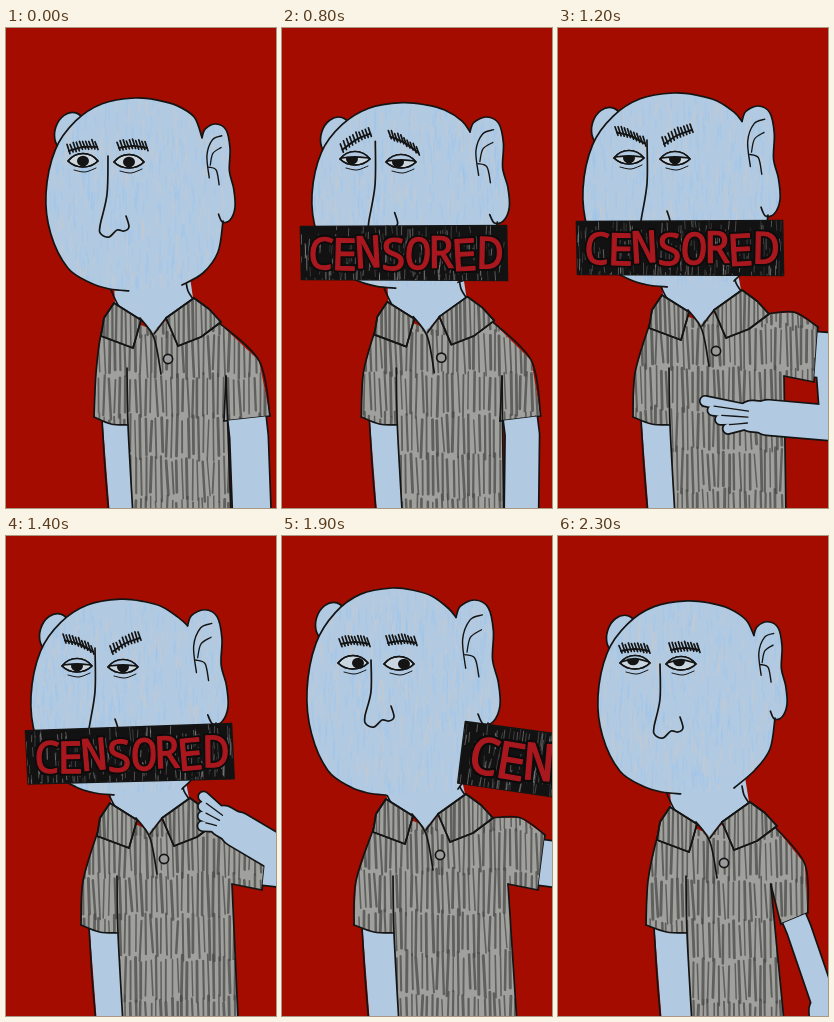
An HTML page with a canvas for the animation above (2.4 s loop, 270 by 480 pixels).

```html
<!DOCTYPE html>
<html lang="en">
<head>
<meta charset="utf-8">
<title>Censored</title>
<style>
html, body { margin: 0; width: 100%; height: 100%; overflow: hidden; background: #a40c00; }
canvas { display: block; width: 100vw; height: 100vh; }
</style>
</head>
<body>
<canvas id="stage" width="270" height="480"></canvas>
<script>
const ctx = document.getElementById('stage').getContext('2d');
const LOOP = 2400, STEP = 100;
const RED = '#a40c00', SKIN = '#b1cae2', CLOTH = '#a0a09d', INK = '#141414';

const mix = (a, b, k) => a + (b - a) * k;
const mixPt = (p, q, k) => [mix(p[0], q[0], k), mix(p[1], q[1], k)];
const clamp = k => Math.min(1, Math.max(0, k));

// The acting: each mood or move is a number from 0 to 1.
function acting(t) {
  const ramp = (a, b) => clamp((t - a) / (b - a));
  const ease = (a, b) => { const k = ramp(a, b); return k * k * (3 - 2 * k); };
  const drop = ease(1900, 2350);
  return {
    turn: ramp(0, 1200) - ramp(1900, 2300),
    hop: ramp(400, 600) - ramp(600, 800),
    worry: ease(600, 800) - ease(800, 1150),
    anger: ease(850, 1200) - ease(1650, 1900),
    look: ease(1600, 1880) - ease(2000, 2300),
    roll: ease(2000, 2300) - ramp(2300, LOOP),
    raise: ease(850, 1200) - ease(1950, LOOP),
    reach: ease(800, 1200),
    grab: ease(1200, 1550),
    hold: ease(1200, 1550) * (1 - drop),
    grow: ramp(230, 700),
    pull: Math.max(0, (t - 1600) / 300) ** 1.2,
    drop
  };
}

function random(seed) {
  return () => {
    seed = (seed * 1664525 + 1013904223) >>> 0;
    return seed / 4294967296;
  };
}

// Smooth line through all points
function curve(pts, move = true) {
  if (move) ctx.moveTo(...pts[0]);
  else ctx.lineTo(...pts[0]);
  for (let i = 0; i < pts.length - 1; i++) {
    const a = pts[i - 1] || pts[i], b = pts[i], c = pts[i + 1], d = pts[i + 2] || c;
    ctx.bezierCurveTo(b[0] + (c[0] - a[0]) / 6, b[1] + (c[1] - a[1]) / 6,
      c[0] - (d[0] - b[0]) / 6, c[1] - (d[1] - b[1]) / 6, c[0], c[1]);
  }
}

function ink(pts, width = 1.7) {
  ctx.beginPath();
  curve(pts);
  ctx.lineWidth = width;
  ctx.strokeStyle = INK;
  ctx.stroke();
}

function poly(pts) {
  const p = new Path2D();
  pts.forEach(q => p.lineTo(...q));
  p.closePath();
  return p;
}

function oval(x, y, rx, ry, turn = 0) {
  const p = new Path2D();
  p.ellipse(x, y, rx, ry, turn, 0, 7);
  return p;
}

function outline(path, fill) {
  ctx.fillStyle = fill;
  ctx.fill(path);
  ctx.lineWidth = 1.7;
  ctx.strokeStyle = INK;
  ctx.stroke(path);
}

function inside(path, paint) {
  ctx.save();
  ctx.clip(path);
  paint();
  ctx.restore();
}

function crayon(rnd, x, y, w, h) {
  ctx.lineWidth = 1.6;
  for (let i = 0; i < w * h / 75; i++) {
    const px = x + rnd() * w, py = y + rnd() * h;
    ctx.strokeStyle = rnd() < .55 ? 'rgba(145,193,238,.3)' : 'rgba(205,200,196,.34)';
    ctx.beginPath();
    ctx.moveTo(px, py);
    ctx.lineTo(px + rnd() * 3 - 1.5, py + 6 + rnd() * 14);
    ctx.stroke();
  }
}

// Rows of upright marker strokes
function marker(rnd, x, y, w, h, gap, row) {
  ctx.strokeStyle = 'rgba(74,74,72,.74)';
  for (let py = y; py < y + h; py += row) {
    for (let px = x; px < x + w; px += gap) {
      ctx.lineWidth = 1.4 + rnd() * 1.6;
      ctx.beginPath();
      ctx.moveTo(px + rnd() * 2, py + rnd() * 9);
      ctx.lineTo(px + rnd() * 3, py + row + rnd() * 10 - 3);
      ctx.stroke();
    }
  }
}

function cuffOf(a) {
  const outer = mixPt([264 - 8 * a.turn, 388], [263 - 3 * (1 - a.hold) * a.turn, 299], a.raise);
  const inner = mixPt([218, 393], [256, 354], a.raise);
  outer[0] -= 14 * a.roll;
  return { outer, inner };
}

function drawBody(a, rnd) {
  const dx = 4 * a.roll - 4 * a.turn, dy = -8 * a.turn + 4 * a.worry - 4 * a.look - 4 * a.roll;
  const shift = pts => pts.map(([x, y]) => [x + dx, y + dy]);
  const edge = 88 - 13 * a.turn - 3 * a.look, seam = 122 - 10 * a.turn + 7 * a.roll;
  const { outer, inner } = cuffOf(a);
  const pit = [220 + 6 * a.raise - 8 * a.roll, 348], hip = [225 - 5 * a.turn + 8 * a.raise + 7 * a.hold, 488];

  ctx.fillStyle = SKIN;
  ctx.fill(poly([[edge + 8, 385], [seam + 4, 385], [seam + 8, 488], [edge + 16, 488]]));
  ink([[edge + 8, 391], [edge + 11, 440], [edge + 15, 488]]);

  const [shoulder] = shift([[212, 294]]);
  const bulge = [(shoulder[0] + outer[0]) / 2 + (outer[1] - shoulder[1]) * .16,
    (shoulder[1] + outer[1]) / 2 - (outer[0] - shoulder[0]) * .16];
  const sleeve = [...shift([[104, 284], [95, 306]]), [edge + 2, 345], [edge, 389]];
  const cuff = [[edge, 389], [mix(edge, seam, .5), 396], [seam, 397]];
  const hem = [seam + 5, 488];
  const [neckSide, neckV] = shift([[188, 272], [147, 302]]);
  const shirt = poly([neckV, ...sleeve, ...cuff, hem, hip, pit, inner, outer, bulge, shoulder, neckSide]);
  ctx.fillStyle = CLOTH;
  ctx.fill(shirt);
  inside(shirt, () => marker(rnd, 66, 262 + dy, 205, 225, 5.2, 41));

  ink(sleeve);
  ink(cuff);
  ink([[seam - 1, 340], [seam, 397], hem]);
  ink([shoulder, bulge, outer]);
  ink([outer, inner]);
  ink([inner, pit]);
  ink([pit, hip]);

  ctx.fillStyle = SKIN;
  ctx.fill(poly([[107 + dx, 235], ...shift([[109, 276], [134, 291], [147, 304], [160, 290], [187, 270]]), [182 + dx, 235]]));
  ink(shift([[105, 262], [109, 271], [113, 279]]));
  ink(shift([[180, 254], [182, 263], [187, 271]]));
  ink(shift([[134, 290], [148, 310], [155, 346]]));
  ink(shift([[148, 306], [160, 290]]));
  const flaps = [
    [[108, 275], [98, 290], [95, 308], [127, 320], [135, 292]],
    [[188, 270], [160, 290], [172, 318], [195, 309], [215, 294], [203, 281]]
  ];
  for (const f of flaps) {
    const flap = poly(shift(f));
    outline(flap, CLOTH);
    inside(flap, () => marker(rnd, f[0][0] + dx - 30, 262 + dy, 65, 60, 4.5, 60));
    ctx.stroke(flap);
  }
  outline(oval(162 + dx, 331 + dy, 4.6, 4.6), '#9b9b9b');
}

function drawHead(a, rnd) {
  const l = 40 - 15 * a.turn;
  const t = 70 - 5 * a.turn + 8 * a.worry - 6 * a.hop - 3 * a.hold - 10 * a.look - 5 * a.roll;
  const b = 261 - 4 * a.turn - 5 * a.roll;
  const x0 = 196 - 12 * a.turn - 4 * a.hold - 6 * a.look;
  const y0 = 96 - 18 * a.turn + 5 * a.worry - 4 * a.hop - 7 * a.hold - 7 * a.look - 10 * a.roll;
  const x1 = 229 - 7 * a.turn + 3 * a.worry - 4 * a.look;
  const y1 = 194 - 6 * a.turn + 5 * a.worry - 11 * a.roll;
  const inHead = ([x, y]) => [mix(l, x0, x), mix(t, b, y)];
  const inEar = ([x, y]) => [mix(x0, x1, x), mix(y0, y1, y)];

  outline(oval(l + 24, t + 34, 15, 20, .3), SKIN);

  const ear = [[0, .14], [.1, .05], [.42, 0], [.73, .06], [.85, .25], [.83, .48], [.96, .66], [1, .85],
    [.85, .98], [.62, 1], [.5, .92]].map(inEar);
  const face = [ear[0], ...[[.95, .1], [.84, .04], [.72, .012], [.57, 0], [.36, .03], [.19, .12], [.06, .27],
    [0, .5], [.03, .71], [.14, .89], [.29, .97], [.41, 1], [.53, 1.01]].map(inHead)];
  const jaw = [[176, b - 4], [x1 - 32, y1 + 51], [x1 - 17, y1 + 30], [x1 - 12, y1 - 1]];

  const skin = poly([...face, ...jaw, ...ear.slice().reverse()]);
  ctx.beginPath();
  curve(face);
  curve(jaw, false);
  curve(ear.slice().reverse(), false);
  ctx.fillStyle = SKIN;
  ctx.fill();
  inside(skin, () => crayon(rnd, l, t, x1 - l, b - t));
  [face, jaw, ear].forEach(pts => ink(pts));
  ink([[.22, .55], [.15, .32], [.32, .16], [.6, .12]].map(inEar), 1.4);
  ink([[.25, .42], [.33, .3], [.58, .24]].map(inEar), 1.3);
  ink([[.2, .44], [.43, .47], [.52, .62]].map(inEar), 1.4);

  const ex = 77 - 6 * a.turn, ey = 132 - 3 * a.turn - 3 * a.look - 6 * a.roll;
  const lid = .65 * Math.max(a.worry, a.anger) + .4 * a.roll;
  const gaze = 5 * a.look - 3 * a.worry - 2 * a.roll;
  drawEye(ex, ey, lid, gaze, 1 - 3 * a.roll);
  drawEye(ex + 46, ey + 1 + 2 * a.worry, lid, gaze, 1 - 3 * a.roll);

  const by = 119 - 11 * a.turn - 2 * a.look - 6 * a.roll;
  drawBrow(77 - 4 * a.turn, by, -4 + 4 * a.look + 4 * a.roll - 12 * a.worry + 15 * a.anger, rnd);
  drawBrow(127 - 7 * a.turn, by - 1 + 4 * a.worry, 16 * a.worry - 14 * a.anger, rnd);

  const nx = 102 - 13 * a.turn, ny = 128 - 4 * a.turn - 12 * Math.max(a.worry, a.anger);
  const tx = 94 - 11 * a.turn + 2 * a.roll, ty = 208 - 5 * a.turn - 13 * a.look - 7 * a.roll;
  ink([[nx, ny], [(nx + tx) / 2 + 3, mix(ny, ty, .48)], [tx, ty - 10], [tx + 1, ty - 2], [tx + 9, ty + 1],
    [tx + 17, ty - 6], [tx + 24, ty - 5], [tx + 29, ty - 9], [tx + 26, ty - 20]]);
}

function drawEye(x, y, lid, px, py) {
  const eye = new Path2D();
  eye.moveTo(x - 15, y + 1);
  eye.bezierCurveTo(x - 7, y - 9, x + 7, y - 9, x + 15, y + 1);
  eye.bezierCurveTo(x + 7, y + 9, x - 7, y + 9, x - 15, y + 1);
  const cover = y - 7 + 9 * lid;
  outline(eye, '#cbd7e0');
  inside(eye, () => {
    ctx.fillStyle = INK;
    ctx.fill(oval(x + px, y + py, 6, 5.3));
    ctx.fillStyle = SKIN;
    ctx.fillRect(x - 16, y - 10, 32, cover - y + 10);
    if (lid > .1) ink([[x - 14, y], [x, cover], [x + 14, y]], 1.6);
  });
  ctx.lineWidth = 1.5;
  ctx.strokeStyle = INK;
  ctx.stroke(eye);
  ink([[x - 9, y + 10], [x + 2, y + 12], [x + 13, y + 8]], 1);
}

function drawBrow(x, y, slant, rnd) {
  for (let i = 0; i < 10; i++) {
    const k = i / 9 - .5, bx = x + k * 28, by = y + k * slant - 2 * Math.cos(k * 3);
    ink([[bx - 2, by - 3 - rnd() * 2], [bx + 1, by + 4 + rnd()]], 1.7);
  }
  ink([[x - 14, y - slant / 2 + 2], [x, y], [x + 14, y + slant / 2 + 2]], 1.9);
}

function barOf(a) {
  const size = 1 + .16 * a.pull;
  return {
    x: 122 - 12 * (1 - a.grow) + 3 * a.grab + 173 * a.pull,
    y: 226 - 6 * a.turn + 3 * a.worry - 3 * a.grab + 16 * a.pull,
    w: 207 * a.grow * size,
    h: 55 * a.grow ** .7 * size,
    angle: -.05 * a.grab + .19 * a.pull
  };
}

function drawBar(a, rnd) {
  const { x, y, w, h, angle } = barOf(a), k = w / 207;
  if (w < 4) return;
  ctx.save();
  ctx.translate(x, y);
  ctx.rotate(angle);
  ctx.translate(-w / 2, 0);
  const box = poly([[0, -h / 2 + 1], [w - 1, -h / 2], [w, h / 2], [1, h / 2 - 1]]);
  outline(box, '#121212');
  inside(box, () => {
    ctx.lineWidth = .7;
    for (let i = 0; i < w * 1.1; i++) {
      const sx = rnd() * w, sy = (rnd() - .5) * h * 1.1;
      ctx.strokeStyle = `rgba(200,200,200,${.2 + rnd() * .45})`;
      ctx.beginPath();
      ctx.moveTo(sx, sy);
      ctx.lineTo(sx + rnd() * 2 - 1, sy + (5 + rnd() * 11) * k);
      ctx.stroke();
    }
  });
  ctx.font = `400 ${44 * k}px "Noto Sans Mono", "DejaVu Sans Mono", monospace`;
  ctx.textAlign = 'center';
  ctx.textBaseline = 'alphabetic';
  [...'CENSORED'].forEach((ch, i) => {
    ctx.save();
    ctx.translate((20 + i * 24.2) * k, 16 * k + Math.sin(i * 2.3) * 1.5 * k);
    ctx.rotate(Math.sin(i * 1.7 + 1) * .06);
    ctx.lineWidth = 5 * k;
    ctx.strokeStyle = '#0c0c0c';
    ctx.strokeText(ch, 0, 0);
    ctx.lineWidth = 1.2 * k;
    ctx.fillStyle = ctx.strokeStyle = '#a9181e';
    ctx.fillText(ch, 0, 0);
    ctx.strokeText(ch, 0, 0);
    ctx.restore();
  });
  ctx.restore();
}

function drawArm(a) {
  const { outer, inner } = cuffOf(a), bar = barOf(a);
  const width = Math.hypot(outer[0] - inner[0], outer[1] - inner[1]);
  const start = mixPt(outer, inner, .5);
  const out = [start[0] + (inner[1] - outer[1]) * .4, start[1] + (outer[0] - inner[0]) * .4];
  const elbow = [246 - 10 * a.turn + 12 * a.roll + 49 * a.raise + 21 * a.grab * a.raise + 20 * a.pull * a.hold,
    490 - 94 * a.raise - 104 * a.hold];

  // From the side to the chest, up to the end of the bar, and down again
  const rest = [246 - 8 * a.turn + 12 * a.roll, 600];
  const grip = [bar.x + Math.cos(bar.angle) * bar.w / 2 + 4, bar.y + Math.sin(bar.angle) * bar.w / 2 + 2];
  const hand = mixPt(mixPt(mixPt(rest, [192, 388], a.reach), grip, a.grab), rest, a.drop);
  const len = mix(12, 42, a.reach * (1 - a.grab));

  const d = Math.hypot(hand[0] - elbow[0], hand[1] - elbow[1]);
  const ux = (hand[0] - elbow[0]) / d, uy = (hand[1] - elbow[1]) / d;
  const local = (f, s) => [hand[0] + ux * f + uy * s, hand[1] + uy * f - ux * s];
  const parts = [
    [width * .8, 'butt', [start, out, elbow]],
    [34, 'round', [elbow, local(-18, 0)]],
    [30, 'round', [local(-10, 0), local(-2, 0)]]
  ];
  for (let i = 0; i < 4; i++) {
    const side = -11 + 8.5 * i;
    parts.push([9, 'round', [local(0, side * .5), local(len * (1 - .2 * i) + 4, side)]]);
  }
  for (const [extra, color] of [[3.4, INK], [0, SKIN]]) {
    for (const [w, cap, pts] of parts) {
      ctx.lineCap = cap;
      ctx.lineWidth = w + extra;
      ctx.strokeStyle = color;
      ctx.beginPath();
      pts.forEach(q => ctx.lineTo(...q));
      ctx.stroke();
    }
  }
  ctx.lineCap = 'round';
  for (let i = 0; i < 3; i++) {
    const side = -6.7 + 8.5 * i;
    ink([local(2, side * .7), local(len * (.8 - .2 * i) + 3, side)], 1.3);
  }
}

function draw(t) {
  const a = acting(t), rnd = random(t * 7 + 31);
  ctx.lineCap = ctx.lineJoin = 'round';
  ctx.fillStyle = RED;
  ctx.fillRect(0, 0, 270, 480);
  drawBody(a, rnd);
  drawHead(a, rnd);
  drawBar(a, rnd);
  drawArm(a);
}

const begin = performance.now();
function tick() {
  const t = (performance.now() - begin) % LOOP;
  draw(Math.floor(t / STEP) * STEP);
  requestAnimationFrame(tick);
}
tick();
</script>
</body>
</html>
```
